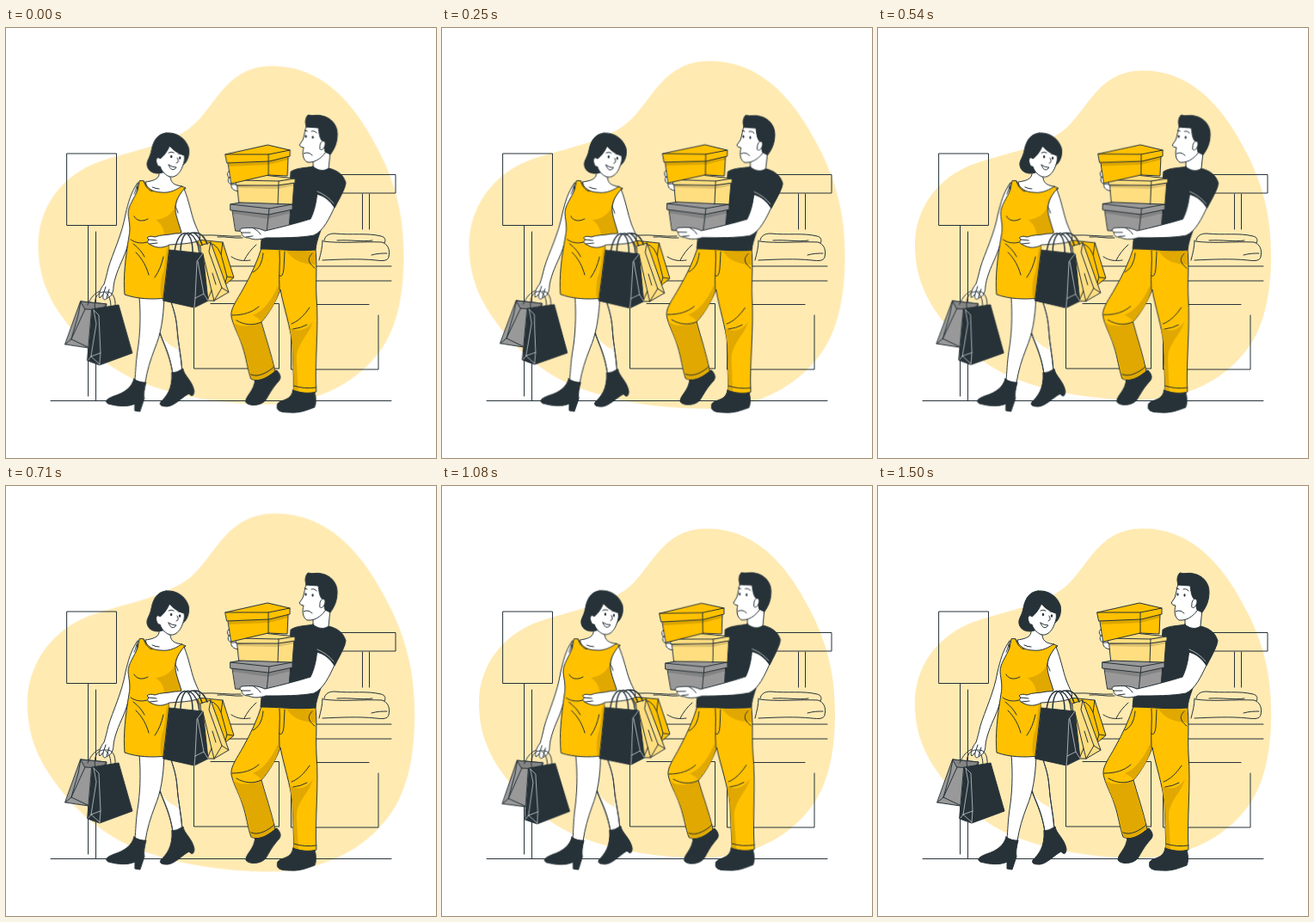
Animation, 500 px wide and 500 px high, one loop 1540 ms. Source, as an HTML page:

```html
<!DOCTYPE html>
<html lang="en">
<head>
<meta charset="utf-8">
<title>Shopping</title>
<style>
  html, body { margin: 0; width: 100%; height: 100%; overflow: hidden; background: #fff; }
  svg { display: block; width: 100vw; height: 100vh; }
  path { fill: none; stroke: #263238; stroke-width: 1; stroke-linecap: round; stroke-linejoin: round; }
  .blob { fill: #ffeab2; stroke: none; }
  .skin { fill: #fff; }
  .ink { fill: #263238; }
  .gold { fill: #ffc100; }
  .pale { fill: #ffde80; }
  .gray { fill: #999; }
  .slate { fill: #858585; }
  .shade { fill: #e0a800; stroke: none; }
  .dim { fill: #000; fill-opacity: .14; stroke: none; }
  .tint { fill: #ffeab2; stroke: none; }
  .light { stroke: #dfe3e5; stroke-width: .7; }
  .thick { stroke-width: 1.5; }
  .dot { fill: #263238; stroke: none; }

  .blob, .sway { animation: 1540ms linear -40ms infinite; }
  .blob { animation-name: beat; transform-origin: 250px 250px; }
  .sway { animation-name: sway; }
  #woman { transform-origin: 166px 284px; }
  #man { transform-origin: 325px 274px; }

  @keyframes beat {
    0%, 30%, 40%, 60%, 100% { transform: scale(1); }
    10%, 50% { transform: scale(1.1); }
  }
  @keyframes sway {
    0%, 100% { transform: rotate(0deg); }
    25% { transform: rotate(1deg); }
    75% { transform: rotate(-1deg); }
  }
</style>
</head>
<body>
<svg viewBox="0 0 500 500">
  <path class="blob" d="M308 49.500C372 49.500 408 104 430 148C449 186 457 222 457 264C457 310 449 352 424 380C398 411 356 432.500 300 432.500C252 432 205 425 160 408C122 393 90 363 69 332C50 305 43 280 43 252C43 213 66 178 104 161C138 147 180 143 213 121C243 100 253 49.500 308 49.500Z"/>

  <!-- shop -->
  <path d="M52 433.500H448M71 146H128.500V229.500H71ZM95.500 230V428M104.500 237V433"/>
  <path d="M380 170.500H453V192H380M414.500 193V234M422.500 193V234"/>
  <path d="M250 277H448M250 294H448M238 320.500H317.500V396M218.500 320V396H317M331.500 320V397H433V334M361 321.500H422"/>
  <path d="M370 247C371 241 376 239 382 239C402 241 420 238 436 242C441 243 442 247 440 250M369 248C390 251 416 248 437 249C444 251 447 258 445 266C444 271 438 271 430 270C410 268 390 269 368 270M364 270C366 262 368 255 368 247M385 247C401 246 414 249 426 247M425 264C432 262 438 262 443 262"/>
  <path d="M228 241C244 240 260 243 273 242M277 270C280 264 285 257 291 252M262 266C270 271 276 271 284 270M246 243C256 242 265 245 275 244"/>

  <g id="woman" class="sway">
    <!-- legs and boots -->
    <path class="skin" d="M181 313C182 330 176 340 177 348C180 362 190 376 194 402L205 399C204 382 200 366 199 350C198 336 195 327 190 313Z"/>
    <path class="tint" d="M182.500 316C183 331 177.500 341 178 348C180 360 186 367 200 374C199 362 199.500 338 190 316Z"/>
    <path d="M178 349C180 362 190 374 194 402M190 313C195 327 198 336 199 350C200 366 204 382 205 399"/>
    <path class="ink" d="M193 401Q199 401 206 396C207 404 217 410 219 422C219 428 216 429 213 425C205 429 197 439 188 440C182 440 178 439 180 435C187 428 194 420 193 401Z"/>
    <path class="skin" d="M155 312C157 335 156 358 153 376C151 390 151 400 150 410L162 413C164 399 168 386 173 373C180 356 183 340 184 312Z"/>
    <path class="ink" d="M149 408Q155 413 163 412C161 420 160 426 161 431L156 446L150 445L150 437C142 441 130 440 119 437C114 434 118 431 126 428C139 424 147 417 149 408Z"/>

    <!-- far bag -->
    <path class="gray" d="M87 318L117 321L108 371L96 372L69 368Z"/>
    <path class="slate" d="M87 318L117 321L112 328L92 327Z"/>
    <path d="M92 327L76 362L69 368M76 362L95 371M87 318L84 334L76 362M95 322C100 309 110 303 118 306"/>

    <!-- left arm and hand -->
    <path class="skin" d="M153 180C145 191 142 204 139 216C135 240 124 262 119 279C117 287 116 292 114 298C109 304 107 312 109 314L113 310C112 315 114 318 118 314C122 313 125 308 125 301C126 291 131 279 136 268C142 254 145 240 149 221Z"/>
    <path d="M116 301L113 310M120 304L117 314"/>
    <path class="ink" d="M100 327L131 322L147 378L109 392L95 387Z"/>
    <path class="light" d="M102 328L105 344L99 382L109 391M99 382L96 386M102 328L108 334L110 378L99 382M110 378L109 391"/>
    <path d="M104 329C101 313 107 306 116 307M127 324C128 313 123 306 117 307M122 325C122 316 120 311 116 308"/>

    <!-- neck and chest -->
    <path class="skin" d="M178 164C179 173 177 177 162 179C164 188 170 196 182 196C193 194 201 188 205 184C198 183 192 182 191 174Z"/>
    <!-- dress -->
    <path class="gold" d="M155 178L153 188C149 199 142 206 142 216C143 226 145 232 143 242C139 267 136 290 138 310C152 315 170 316 186 314C190 296 190 270 189 252L206 244C202 230 196 216 197 207C198 198 203 192 209 186L204 184C195 190 188 192 180 191C170 191 164 186 160 178Z"/>
    <path class="shade" d="M196.500 208C192 217 184 222 174 223C181 228 184 234 184 242L204 240C201 229 197 216 196.500 208ZM189 250C184 260 187 274 181 290C179 302 179 309 181 314L186 313C190 296 190 268 189 250Z"/>
    <path d="M160 178C162 185 166 189 170 190M149 219C151 224 158 226 165 222M145 246C150 250 158 251 164 249M151 261C159 269 163 277 166 287M148 251C154 256 158 260 161 266M173 290C178 283 181 275 183 266M152 184C151 188 150 191 149 193M170 185Q174 187 178 187"/>

    <!-- head -->
    <path class="ink" d="M186 122C176 123 171 131 169 142C167 152 163 154 164 160C165 167 173 171 182 168L203 161C210 158 214 148 212 139C208 127 197 121 186 122Z"/>
    <path class="skin" d="M190 137C187 144 183 149 179 152C176 149 173 152 175 157C176 161 178 161 179 161C181 167 186 172 191 173C198 174 203 167 205 161C207 156 208 152 207 148C200 146 194 142 190 137Z"/>
    <ellipse class="dot" cx="192" cy="149.500" rx="1.200" ry="1.700"/>
    <ellipse class="dot" cx="202" cy="151" rx="1.200" ry="1.700"/>
    <path d="M189 145Q192 143 195 145M200 146Q203 145 205 147M199 151Q202 156 198 157"/>
    <path class="skin" d="M189 159Q193 162 198 162Q194 167 191 163Z"/>

    <!-- hanging bags -->
    <path class="gold" d="M222 246L252 249L265 290L254 299L238 280Z"/>
    <path d="M252 249L250 263L257 289L254 299M257 289L264 290M231 252Q243 246 250 263"/>
    <path class="pale" d="M226 253L238 249L259 307L242 317L234 317Z"/>
    <path d="M238 249L236 260L251 302L259 307M251 302L242 317M229 263L239 305L234 317M239 305L242 317M240 285L244 298"/>
    <path class="ink" d="M190 258L229 262L235 317L219 325L183 317Z"/>
    <path class="light" d="M229 262L222 271L220 314L219 325M220 314L230 309L235 317M223 271L230 309"/>

    <!-- right arm -->
    <path class="skin" d="M207 187C213 202 215 215 219 226C223 237 229 244 223 248C213 251 202 251 190 252C183 256 176 256 170 253L166 251Q163 249 166 246L164 244Q167 241 173 243C180 240 188 241 196 239Q203 239 204 238C201 227 196 216 197 208C198 198 203 192 207 187Z"/>
    <path d="M166 246L175 247M167 251L176 250M197 208Q199 211 200 215"/>
    <path class="thick" d="M196 259C199 242 205 237 210 239C216 243 217 253 217 261M203 260C203 246 208 235 214 239C220 243 224 252 225 262M213 240C217 235 224 240 228 252M218 238C226 237 231 243 234 251"/>
  </g>

  <g id="man" class="sway">
    <!-- shoes -->
    <path class="ink" d="M290 408L315 398C319 402 321 407 317 411C309 420 307 425 302 433C296 440 282 440 279 435C279 427 289 423 290 408Z"/>
    <path class="ink" d="M334 421L359 423C361 430 361 437 359 441C351 444 342 448 330 447C317 447 314 444 316 437C321 431 332 434 334 421Z"/>

    <!-- trousers -->
    <path class="gold" d="M297 256C292 272 285 287 276 303C269 316 261 326 262 335C264 346 270 355 275 370C280 385 281 397 285 408C294 413 306 405 313 399C309 380 302 360 297 342C306 332 314 318 319 304C323 325 331 348 333 368L335 421C343 425 354 425 361 423C359 386 364 348 361 312C360 292 362 278 360 258Z"/>
    <path class="shade" d="M264 342C272 349 285 347 296 342C301 360 308 378 312 398C304 405 294 411 286 408C282 394 280 381 275 369Z"/>
    <path class="shade" d="M326 259L360 260L360 275C346 275 333 270 326 259ZM316 300C310 315 300 329 287 334C293 337 297 340 297 342C307 330 315 318 318 304ZM330 348C340 355 350 351 357 341C352 358 338 366 338 385L340 422L335 421L333 368Z"/>
    <path d="M318 259C319 272 317 289 318 304M318 288Q322 291 323 280L324 260M299 262C298 273 294 281 287 284M356 262C351 267 350 272 359 279M263 334C276 334 286 331 294 324M268 340C278 346 288 346 297 342M332 344C340 341 347 334 353 325M334 350Q343 349 350 345M285 403C294 407 305 400 312 394M335 416Q347 420 361 418"/>

    <!-- neck and face -->
    <path class="skin" d="M357 150L357 162C361 168 371 168 375 163L377 143Z"/>
    <path class="skin" d="M350 111C347 119 347 125 345 130L341 136Q342 139 346 139C344 146 345 153 350 156C358 157 366 152 371 145L377 136L370 112Z"/>
    <path class="ink" d="M349 115C347 109 348 104 351 101C357 103 361 100 367 102C378 104 385 113 385 123C385 133 382 140 377 147L371 144L368 132C364 128 364 122 363 116C358 116 353 115 349 115Z"/>
    <path class="skin" d="M365 136C366 130 371 130 371 135C370 140 367 143 365 141Z"/>
    <ellipse class="dot" cx="348.500" cy="126" rx="1.100" ry="1.800"/>
    <ellipse class="dot" cx="356.500" cy="127" rx="1.100" ry="1.800"/>
    <path d="M355 120Q359 119 361 122M347 119L350 120M346 146Q351 143 356 148"/>

    <!-- shirt -->
    <path class="ink" d="M357 161C348 163 339 162 331 167L326 238L297 246L296 257C317 257 338 260 360 258C361 246 366 236 371 221C374 216 378 212 381 208C388 196 394 187 395 180C392 169 383 165 375 163C370 167 362 166 357 161Z"/>
    <path class="light" d="M363 187Q371 187 378 192M372 181Q378 183 382 187"/>

    <!-- far hand -->
    <path class="skin" d="M262 166C257 166 256 170 259 174C257 178 259 181 262 182C261 186 264 189 270 190L276 170Z"/>
    <path d="M259 174L265 175M262 182L267 182"/>

    <!-- gray box -->
    <path class="gray" d="M263 210L304 213L331 208L329 233L303 238L267 236Z"/>
    <path class="dim" d="M263 212L305 217L332 211V215L304 222L264 216Z"/>
    <path class="gray" d="M261 205L283 201L333 205L333 211L305 217L261 212Z"/>
    <path d="M261 205L306 210L333 205M306 210L303 238"/>

    <!-- pale box -->
    <path class="pale" d="M269 183L316 182L335 178L333 205L271 203Z"/>
    <path class="dim" d="M269 183L316 183L335 180V183L316 187L269 186Z"/>
    <path class="pale" d="M267 177L290 170L336 175L336 180L316 183L268 183Z"/>
    <path d="M267 177L317 178L336 175M317 178L316 205"/>

    <!-- gold box -->
    <path class="gold" d="M258 155L305 152L328 149L327 172L305 171L262 181Z"/>
    <path class="dim" d="M258 157L306 155L328 149V153L305 159L259 161Z"/>
    <path class="gold" d="M255 147L304 136L330 142L330 149L306 155L257 157Z"/>
    <path d="M255 147L305 147L330 142M305 147L305 171"/>

    <!-- near arm -->
    <path class="skin" d="M362 189C361 201 359 212 354 222C338 227 318 232 301 236C293 232 284 232 274 233Q270 235 274 238C274 242 277 244 282 244C288 247 296 246 302 244C322 244 342 244 358 241C369 236 376 221 382 208C377 199 370 193 362 189Z"/>
    <path d="M274 238L284 238M279 243L287 242M288 233Q294 236 296 240"/>
    <path class="ink" d="M361 188C366 180 376 176 387 177L394 184C391 193 386 201 382 209C377 201 370 195 361 193Z"/>
    <path class="light" d="M362 190Q374 195 381 204"/>
  </g>
</svg>
</body>
</html>
```
